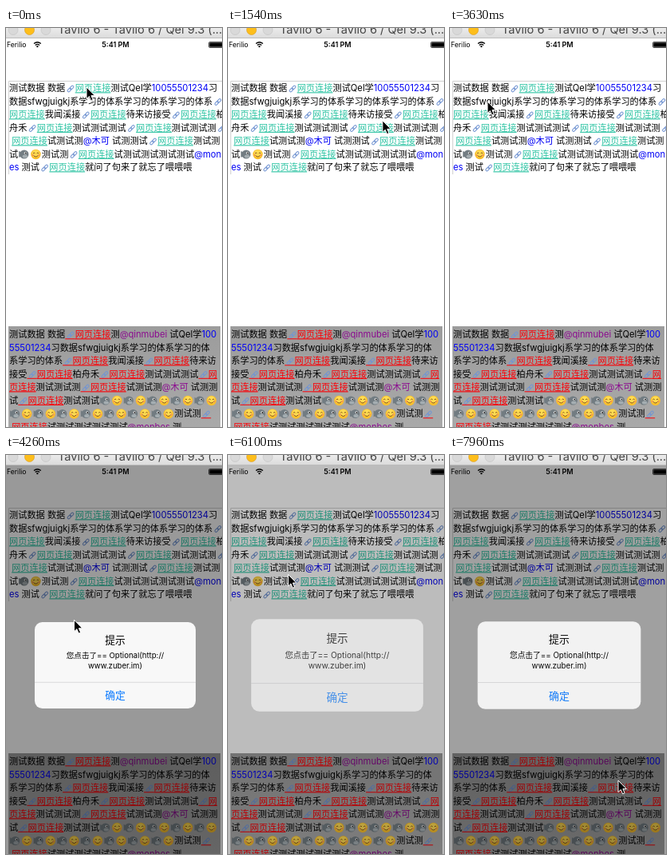
An HTML page that plays this animation: 271 px wide and 499 px high, repeating every 8000 ms.

```html
<!DOCTYPE html>
<html lang="zh-CN">
<head>
<meta charset="utf-8">
<style>
html, body { margin: 0; width: 100%; height: 100%; overflow: hidden; background: #fff; }
svg { display: block; width: 271px; height: 499px; }
text { font-family: Inter, 'Noto Sans CJK SC', 'Noto Sans CJK', sans-serif; white-space: pre; }
.run { font-size: 11.2px; }
.link { text-decoration: underline; }
.mid { text-anchor: middle; }
</style>
</head>
<body>
<svg viewBox="0 0 271 499">
  <defs>
    <linearGradient id="bar" x2="0" y2="1"><stop stop-color="#ebebeb"/><stop offset="1" stop-color="#dcdcdc"/></linearGradient>
    <linearGradient id="gray" x2="0" y2="1"><stop stop-color="#9c9c9c"/><stop offset="1" stop-color="#a9a9a9"/></linearGradient>
    <g id="chain" fill="none" stroke="#7395d2" stroke-width="1">
      <rect x="-2.7" y="-1.5" width="5.4" height="3" rx="1.5" transform="translate(5.2 -1.8) rotate(-45)"/>
      <rect x="-2.7" y="-1.5" width="5.4" height="3" rx="1.5" transform="translate(8.2 -4.8) rotate(-45)"/>
    </g>
    <g id="fish">
      <path d="M1 -8L4 -6V-1L1 0Z" fill="#727c82"/>
      <circle cx="7.6" cy="-3.8" r="5.6" fill="#727c82"/>
      <ellipse cx="8.6" cy="-1.3" rx="3.2" ry="2" fill="#a4adb1"/>
      <circle cx="9.2" cy="-5.5" r="1.6" fill="#f4f4f4"/>
      <circle cx="9.5" cy="-5.4" r="1" fill="#222"/>
    </g>
    <g id="smile">
      <circle cx="7.4" cy="-3.8" r="6.2" fill="#f9bf2c"/>
      <circle cx="7.4" cy="-4.8" r="4.6" fill="#ffdc52"/>
      <path d="M4 -5q1.2 -1.6 2.4 0M8.6 -5q1.2 -1.6 2.4 0M4.4 -2.6q3 3.6 6 0" fill="none" stroke="#7b4714" stroke-width=".95"/>
      <circle cx="3.6" cy="-2.9" r="1" fill="#f58a58"/><circle cx="11.2" cy="-2.9" r="1" fill="#f58a58"/>
    </g>
  </defs>

  <rect width="271" height="499" fill="#fff"/>
  <text x="1" y="24" font-size="8.6">Ferilio</text>
  <g fill="none" stroke="#000" stroke-width="1.3">
    <path d="M35 19.6q4.4 -3.8 8.8 0M36.7 21.6q2.7 -2.4 5.4 0"/>
    <circle cx="39.4" cy="23.2" r=".5"/>
  </g>
  <text class="mid" x="137.5" y="24" font-size="9" font-weight="600">5:41 PM</text>
  <rect x="254.5" y="17.5" width="19" height="7" rx="1.2" fill="none" stroke="#000" stroke-width=".7"/>
  <rect x="255.3" y="18.3" width="16" height="5.4" fill="#000"/>

  <path d="M271 66.5H3.5V183" fill="none" stroke="#c6c6c6" stroke-width=".8"/>
  <g id="top"></g>
  <rect x="3" y="373" width="266" height="126" fill="url(#gray)"/>
  <g id="bottom"></g>

  <rect id="dim" y="13" width="271" height="486" opacity="0"/>
  <g id="alerts"></g>

  <rect width="271" height="12" fill="url(#bar)"/>
  <rect y="12" width="271" height="1" fill="#bdbdbd"/>
  <g stroke-width=".7">
    <circle cx="9" cy="2.5" r="6" fill="#d9d9d9" stroke="#c4c4c4"/>
    <circle cx="29.5" cy="2.5" r="6" fill="#fdbe1b" stroke="#dfa023"/>
    <circle cx="50" cy="2.5" r="6" fill="#d9d9d9" stroke="#c4c4c4"/>
  </g>
  <text x="65" y="7.3" font-size="14.6" fill="#454545">Tavilo 6 - Tavilo 6 / Qel 9.3 (...</text>

  <path id="cursor" d="M0 0V14.6L3.4 11.5L5.6 16.8L8.1 15.8L5.9 10.6H10.4Z" fill="#000" stroke="#fff" stroke-width="1"/>
</svg>
<script>
const LOOP = 8000, FADE = 400, ALERT_FADE = 370, DIM = 0.4;
const $ = id => document.getElementById(id);

function add(parent, tag, attrs, text) {
  const el = document.createElementNS('http://www.w3.org/2000/svg', tag);
  for (const k in attrs) el.setAttribute(k, attrs[k]);
  if (text) el.textContent = text;
  parent.appendChild(el);
  return el;
}

// Markup: # icon and link, ~ icon, [link], {mention}, (number), ^ fish, * smile
const icons = { '~': ['chain', 12.4], '^': ['fish', 14.8], '*': ['smile', 14.8] };

function drawLines(parent, lines, y, colors) {
  lines.forEach((line, row) => {
    let x = 4;
    const base = y + row * 16.5;
    const parts = line.replace(/#/g, '~[网页连接]').match(/[~^*]|\[[^\]]*\]|\{[^}]*\}|\([^)]*\)|[^~^*[{(]+/g);
    for (const part of parts) {
      const icon = icons[part], fill = colors[part[0]];
      if (icon) {
        add(parent, 'use', { href: '#' + icon[0], x, y: base });
        if (fill) add(parent, 'rect', { x, y: base + 1, width: icon[1], height: 1, fill });
        x += icon[1];
        continue;
      }
      const run = add(parent, 'text', { x, y: base, fill: fill || '#000', class: part[0] === '[' ? 'run link' : 'run' },
        fill ? part.slice(1, -1) : part);
      x += run.getComputedTextLength();
    }
  });
}

drawLines($('top'), [
  '测试数据 数据#测试Qel学(10055501234)习',
  '数据sfwgjuigkj系学习的体系学习的体系学习的体系~',
  '[网页连接]我闻溪接#待来访接受#柏',
  '舟禾#测试测试测试#测试测试测~',
  ' [网页连接]试测试测{@木可} 试测测试#测试测',
  '试^*测试测#试测试测试测试测试{@monb}',
  '{es} 测试#就问了句来了就忘了喂喂喂'
], 79.3, { '[': '#2fc4a4', '{': '#0000f5', '(': '#0000f5' });

drawLines($('bottom'), [
  '测试数据 数据#测{@qinmubei} 试Qel学(100)',
  '(55501234)习数据sfwgjuigkj系学习的体系学习的体',
  '系学习的体系#我闻溪接#待来访',
  '接受#柏舟禾#测试测试测试~[网]',
  '[页连接]测试测试测#试测试测{@木可} 试测测',
  '试#测试测试' + '^*'.repeat(5),
  '^*'.repeat(7) + '测试测~',
  '[ 网页连接]试测试测试测试测试{@monbes} 测'
], 387.3, { '[': '#fb0007', '~': '#fb0007', '{': '#8b0a8f', '(': '#0000f5' });

const siteLines = ['您点击了== Optional(http://', 'www.zuber.im)'];
const alerts = [
  [100, 950, ['您点击了== Optional(https://', 'www.baidu.com)']],
  [2135, 2890, ['点击的电话号码是== 10055501234']],
  [3800, 4683, siteLines],
  [5860, 6985, siteLines],
  [7628, Infinity, siteLines]
].map(([open, close, lines]) => {
  const g = add($('alerts'), 'g', { opacity: 0 });
  const h = 82.5 + 12.8 * lines.length, top = -h / 2, bottom = h / 2;
  add(g, 'rect', { x: -101, y: top, width: 202, height: h, rx: 9.5, fill: '#f8f8f8' });
  add(g, 'text', { class: 'mid', y: top + 26.8, 'font-size': 12.75, 'font-weight': 500 }, '提示');
  lines.forEach((s, i) => add(g, 'text', { class: 'mid', y: top + 45.4 + i * 12.6, 'font-size': 9.6 }, s));
  add(g, 'rect', { x: -101, y: bottom - 33.2, width: 202, height: 0.7, fill: '#cfcfd2' });
  add(g, 'text', { class: 'mid', y: bottom - 12, 'font-size': 12.75, 'font-weight': 500, fill: '#0a7aff' }, '确定');
  return { open, close, g };
});

// time, x, y of the pointer tip
const path = [
  [0, 101, 74], [330, 101, 75], [760, 134, 304], [1060, 135, 304], [1720, 206, 77], [2220, 205, 77],
  [2390, 200, 105], [2740, 137, 297], [2960, 136, 297], [3480, 54, 89], [3630, 47, 92], [3760, 32, 107],
  [4010, 32, 107], [4500, 135, 298], [4760, 135, 298], [4950, 133, 259], [5690, 70, 137], [6000, 70, 137],
  [6560, 140, 296], [7190, 141, 295], [7590, 211, 407], [LOOP, 211, 407]
];

const ease = p => (1 - Math.cos(Math.PI * Math.min(1, Math.max(0, p)))) / 2;

function render(t) {
  let shade = 0;
  for (const { open, close, g } of alerts) {
    const shown = ease((t - open) / FADE);
    g.setAttribute('opacity', shown * (1 - ease((t - close) / ALERT_FADE)));
    g.setAttribute('transform', `translate(137 263) scale(${1.2 - 0.2 * shown})`);
    shade = Math.max(shade, shown * (1 - ease((t - close) / FADE)));
  }
  $('dim').setAttribute('opacity', DIM * shade);

  const i = path.findIndex(p => p[0] > t);
  const [t0, x0, y0] = path[i - 1], [t1, x1, y1] = path[i];
  const k = ease((t - t0) / (t1 - t0));
  $('cursor').setAttribute('transform', `translate(${x0 + (x1 - x0) * k} ${y0 + (y1 - y0) * k})`);
}

const start = performance.now();
function tick() {
  render((performance.now() - start) % LOOP);
  requestAnimationFrame(tick);
}
tick();
</script>
</body>
</html>
```
